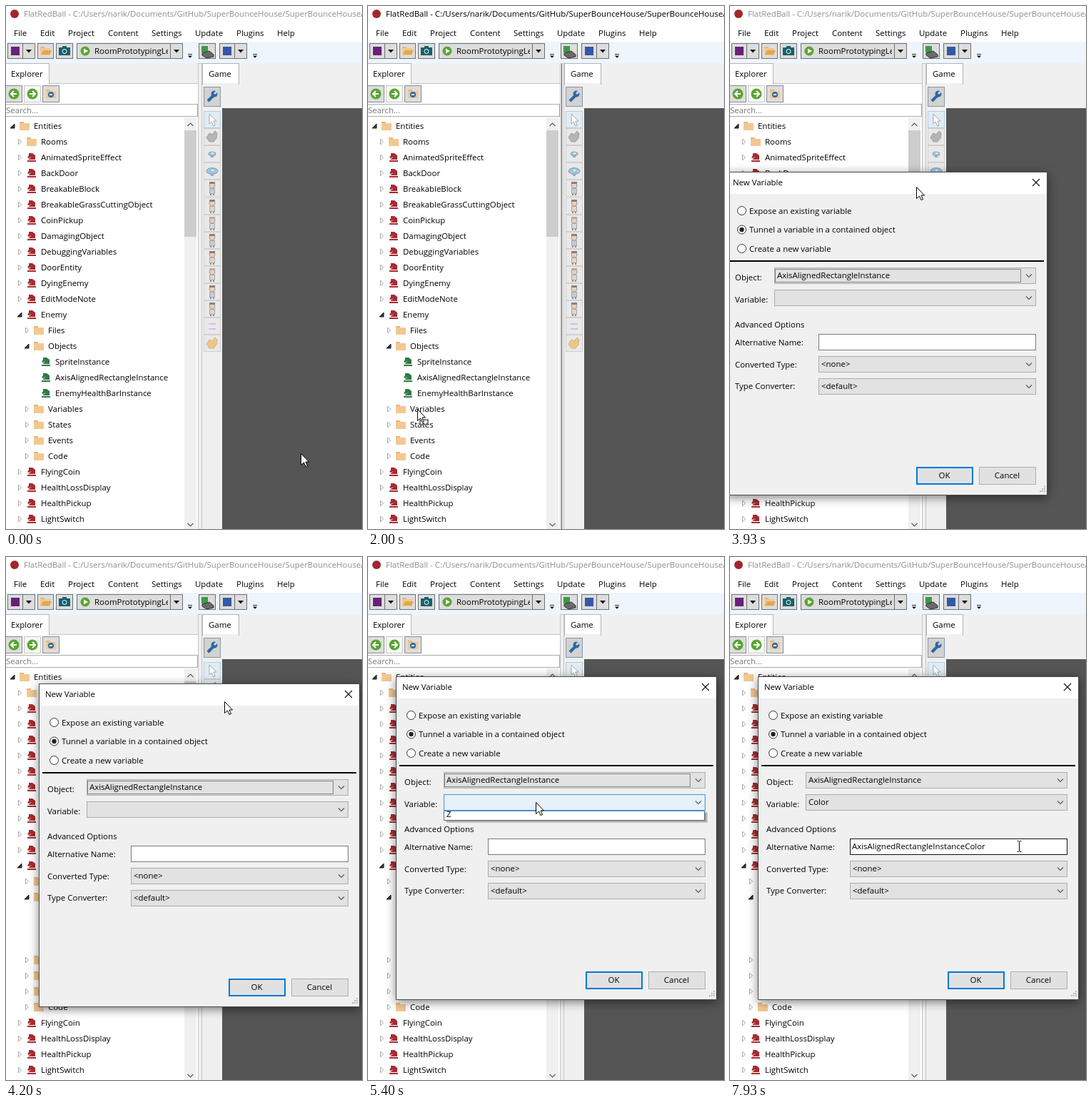
An HTML page with a canvas that plays this animation: 499 px wide and 732 px high, repeating every 8000 ms.

```html
<!DOCTYPE html>
<html lang="en">
<head>
<meta charset="utf-8">
<title>New variable dialog</title>
<style>
html, body { margin: 0; width: 100%; height: 100%; overflow: hidden; background: #fff; }
canvas { display: block; }
</style>
</head>
<body>
<canvas id="stage" width="499" height="732"></canvas>
<script>
const LOOP = 8000, STEP = 1000 / 15;
const DW = 448, DH = 451;
const DRAG = { start: 3660, leg: 270, lead: 20 };
const TIME = { press: 990, drag: 1060, drop: 2790, list: 5385, focus: 5520, choose: 6720, autofill: 6790 };

const stage = document.getElementById('stage').getContext('2d');
const dialogCanvas = document.createElement('canvas');
dialogCanvas.width = DW + 2;
dialogCanvas.height = DH + 2;
const dialogCtx = dialogCanvas.getContext('2d');
dialogCtx.translate(1, 1);
let g = stage;

// Eased cursor moves: start time, end time, destination
const moves = [
  [70, 530, 128, 505], [530, 730, 112, 519], [1060, 1800, 68, 559], [1870, 2000, 69, 564],
  [2990, 3600, 102, 359], [4640, 5330, 235, 343], [6080, 6500, 232, 360], [7400, 7930, 405, 405]];
// Where the dialog passes, one leg of time apart
const dragPath = [[-156, 333], [-5, 234], [47, 178], [40, 168]];

const menu = ['File', 'Edit', 'Project', 'Content', 'Settings', 'Update', 'Plugins', 'Help'];
const choices = ['Color', 'Height', 'Visible', 'Width', 'X', 'Y', 'Z'];
// Depth, kind (v open, > closed, r entity, R open entity, g object), name
const tree = `0v Entities|1> Rooms|1r AnimatedSpriteEffect|1r BackDoor|1r BreakableBlock
1r BreakableGrassCuttingObject|1r CoinPickup|1r DamagingObject|1r DebuggingVariables|1r DoorEntity
1r DyingEnemy|1r EditModeNote|1R Enemy|2> Files|2v Objects|3g SpriteInstance
3g AxisAlignedRectangleInstance|3g EnemyHealthBarInstance|2> Variables|2> States|2> Events|2> Code
1r FlyingCoin|1r HealthLossDisplay|1r HealthPickup|1r LightSwitch`.split(/[|\n]/);

const clamp = (v, a = 0, b = 1) => Math.min(b, Math.max(a, v));

function dialogAt(t) {
  const s = clamp((t - DRAG.start) / DRAG.leg, 0, 3), i = Math.min(2, Math.floor(s)), u = s - i;
  const point = k => dragPath[clamp(k, 0, 3)];
  return [0, 1].map(c => {
    const [p, a, b, n] = [-1, 0, 1, 2].map(k => point(i + k)[c]);
    const m = (b - p) / 2, e = (n - a) / 2;
    return a + u * (m + u * (3 * (b - a) - 2 * m - e + u * (m + e - 2 * (b - a))));
  });
}

function cursorAt(t) {
  if (t >= DRAG.start && t < 4640) {
    const [x, y] = dialogAt(t + DRAG.lead);
    return [Math.round(x + 258), Math.round(y + 26)];
  }
  let x = 413, y = 626;
  for (const [from, to, ex, ey] of moves) {
    if (from == 4640 && t >= from) [x, y] = [298, 194];
    const p = clamp((t - from) / (to - from)), e = p * p * (3 - 2 * p);
    x += (ex - x) * e;
    y += (ey - y) * e;
  }
  return [Math.round(x), Math.round(y)];
}

function fill(x, y, w, h, color) { g.fillStyle = color; g.fillRect(x, y, w, h); }
function box(x, y, w, h, color, border, b = 1) {
  fill(x, y, w, h, border);
  fill(x + b, y + b, w - 2 * b, h - 2 * b, color);
}
function text(s, x, y, color = '#000', align = 'left') {
  g.font = '11.45px "Open Sans", "Noto Sans", sans-serif';
  g.textAlign = align;
  g.fillStyle = color;
  g.fillText(s, x, y + 4);
  return g.measureText(s).width;
}
function shape(x, y, pts, color, line, width = 1, open = false) {
  g.beginPath();
  for (let i = 0; i < pts.length; i += 2) g.lineTo(x + pts[i], y + pts[i + 1]);
  if (!open) g.closePath();
  if (color) { g.fillStyle = color; g.fill(); }
  if (line) { g.strokeStyle = line; g.lineWidth = width; g.stroke(); }
}
const stroke = (x, y, pts, color, width = 1) => shape(x, y, pts, null, color, width, true);
function disc(x, y, r, color, line, flat = 1) {
  g.beginPath();
  g.ellipse(x, y, r, r * flat, 0, 0, 7);
  g.fillStyle = color;
  g.fill();
  if (line) { g.strokeStyle = line; g.lineWidth = 1; g.stroke(); }
}
function clipped(x, y, w, h, paint) {
  g.save();
  g.beginPath();
  g.rect(x, y, w, h);
  g.clip();
  paint();
  g.restore();
}
function dotted(x, y, w, h) {
  g.setLineDash([1, 1]);
  g.strokeStyle = '#222';
  g.lineWidth = 1;
  g.strokeRect(x + .5, y + .5, w, h);
  g.setLineDash([]);
}
const chevron = (x, y, s = 1) => stroke(x, y, [-4, -2 * s, 0, 2 * s, 4, -2 * s], '#555', 1.1);
const dropArrow = (x, y, r = 4) => shape(x, y, [-r, -r / 2, r, -r / 2, 0, r * .6], '#111');

function folder(x, y) {
  fill(x, y - 6, 6, 3, '#e9b57c');
  fill(x, y - 4, 14, 10, '#f2c891');
}
function knight(x, y, color) {
  shape(x, y, [-5, 3, 5, 3, 5, -3, 1, -6, -4, -6, -4, -3, -6, 0, -4, 1, 0, -1], color);
  fill(x - 6, y + 4, 12, 2, color);
}
function greenArrow(x, y, dir) {
  disc(x, y, 7.5, '#5aa432');
  stroke(x, y, [-4 * dir, 0, 4 * dir, 0], '#fff', 2);
  stroke(x, y, [0, -4, 4 * dir, 0, 0, 4], '#fff', 2);
}

function drawTree(hover) {
  if (hover >= 0) fill(0, 157 + hover * 22, 250, 22, '#e5f3fb');
  tree.forEach((row, i) => {
    const x = row[0] * 10, y = 168 + i * 22, kind = row[1];
    if ('vR'.includes(kind)) shape(x + 9, y, [-3, 3, 3, 3, 3, -3], '#333', '#222');
    else if (kind != 'g') shape(x + 9, y, [-1.5, -4, 2.5, 0, -1.5, 4], '#fff', '#a6a6a6');
    if ('v>'.includes(kind)) folder(x + 19, y);
    else knight(x + 26, y, kind == 'g' ? '#2f7a45' : '#a52c31');
    text(row.slice(3), x + 39, y);
  });
  fill(250, 156, 17, 576, '#f0f0f0');
  fill(250, 174, 17, 149, '#cdcdcd');
  chevron(258.5, 166, -1);
  chevron(258.5, 726);
}

function person(y, n) {
  disc(289, y - 4, 4, '#e8d0bd', '#a59b94');
  fill(285, y - 9, 8, 3, n % 3 ? '#8d8079' : '#b9aaa0');
  box(285, y, 8, 8, ['#d4d8dc', '#c4ccd6', '#e3d4c8'][n % 3], '#b0a8a2');
  fill(286, y + 8, 2, 2, '#8b8b8b');
  fill(290, y + 8, 2, 2, '#8b8b8b');
}
const blob = (y, color, edge) => shape(289, y, [-8, 1, -4, -5, 0, -3, 4, -8, 7, -5, 6, 2, 2, 7, -4, 7], color, edge);
function saucer(y, r) {
  disc(289, y, r, '#9fc7df', '#8199ad', .55);
  fill(288, y - 2, 3, 2, '#e4f2fa');
  fill(287, y + r * .6, 4, 2, '#96aab9');
}

function drawPalette() {
  fill(275, 108, 224, 624, '#f0f0f0');
  box(277, 113, 24, 28, '#d2d2d2', '#8795a3');
  stroke(289, 127, [-6, 6, 3, -3], '#2b66a5', 4);
  disc(292, 123, 4.5, '#2b66a5');
  stroke(295, 120, [-3, 3, 3, -3], '#d2d2d2', 3);
  for (let i = 0; i < 14; i++) {
    const y = Math.round(159 + i * 24.1);
    box(277, y - 12, 24, 24, i ? '#e9e9e9' : '#e1ebf3', i ? '#d0d0d0' : '#b9cddd');
    if (i == 0) shape(285, y - 8, [0, 0, 0, 14, 3, 11, 6, 17, 8, 16, 6, 10, 10, 10], '#fff', '#a0a6ab');
    else if (i == 1) blob(y, '#b5b5b5', '#a0a0a0');
    else if (i < 4) saucer(y, i == 2 ? 5 : 8);
    else if (i < 12) person(y, i);
    else if (i == 12) for (const dy of [-4, 3]) fill(284, y + dy, 10, 2, '#d3bce8');
    else blob(y, '#ecc886', '#cdb48a');
  }
  fill(303, 143, 196, 589, '#555');
}

function drawToolbar() {
  const button = (x, w) => box(x, 52, w, 22, '#ddd', '#707070');
  const dropButton = x => { button(x, 18); dropArrow(x + 9, 63); };
  fill(0, 50, 499, 30, '#eef5fd');
  button(2, 22);
  fill(7, 57, 12, 12, '#68217a');
  dropButton(23);
  button(44, 23);
  folder(48, 63);
  shape(49, 68, [0, 0, 3, -6, 15, -6, 12, 0], '#e0a84f');
  button(70, 24);
  fill(74, 58, 16, 11, '#15616d');
  fill(79, 56, 6, 3, '#15616d');
  disc(82, 63.5, 3, '#15616d', '#fff');
  button(99, 132);
  disc(111, 63, 6.5, '#5aa432');
  shape(111, 63, [-2, -3.5, 4, 0, -2, 3.5], '#fff');
  clipped(120, 52, 107, 22, () => text('RoomPrototypingLevel', 124, 63));
  dropButton(230);
  button(270, 24);
  fill(274, 56, 9, 9, '#3b9a46');
  shape(275, 63, [0, 3, 10, 0, 16, 5, 16, 8, 6, 10, 0, 6], '#6a6a6a', '#333');
  button(299, 22);
  fill(304, 57, 12, 12, '#3458a8');
  dropButton(320);
  for (const x of [258, 349]) {
    fill(x - 3, 67, 6, 1, '#333');
    dropArrow(x, 71, 3);
  }
}

function drawTab(x, w, name, base) {
  box(x, 80, w, 30, '#fff', '#b4b4b4');
  fill(x + 1, 108, w - 2, 3, base);
  text(name, x + 9, 95);
}

function drawWindow(active, hover) {
  fill(0, 0, 499, 732, '#fff');
  disc(12, 11, 6, '#a3262c');
  text('FlatRedBall - C:/Users/narik/Documents/GitHub/SuperBounceHouse/SuperBounceHouse/S', 25, 11, active ? '#000' : '#8f8f8f');
  menu.reduce((x, name) => Math.round(x + text(name, x, 38) + 18.7), 11);
  drawToolbar();
  fill(0, 80, 499, 29, '#f0f0f0');
  fill(0, 108, 499, 1, '#c4c4c4');
  drawPalette();
  drawTab(-2, 63, 'Explorer', '#fff');
  drawTab(275, 52, 'Game', '#f0f0f0');
  for (let i = 0; i < 3; i++) box(26 * i - 1, 111, 24, 24, i == 1 ? '#f6f6f6' : '#ddd', i == 1 ? '#c8c8c8' : '#8a8a8a');
  greenArrow(11, 123, -1);
  greenArrow(37, 123, 1);
  folder(56, 123);
  disc(63, 124, 4, '#2d6ba5');
  fill(61, 123, 4, 2, '#fff');
  box(-1, 137, 270, 18, '#fff', '#ababab');
  text('Search...', 0, 146, '#777');
  drawTree(hover);
  box(269, 80, 6, 653, '#f0f0f0', '#c4c4c4');
  if (active) dotted(271, 81, 0, 651);
}

function combo(x, y, value, hot, focus) {
  box(x, y, 433 - x, 23, hot ? '#e5f1fb' : '#e2e2e2', hot ? '#4a90d0' : '#acacac');
  text(value, x + 4, y + 11);
  chevron(423, y + 11.5);
  if (focus) dotted(x + 1, y + 2, 344, 18);
}

function drawChoices(h, my) {
  const x = 66, y = 187;
  for (const d of [2, 4]) fill(x + d, y + d - 1, 366, h, 'rgba(0,0,0,.2)');
  clipped(x, y, 366, h, () => {
    box(x, y + h - 135, 366, 135, '#fff', '#707070');
    choices.forEach((s, i) => {
      const top = y + h - 133 + i * 19;
      if (h == 135 && my >= top && my < top + 19) box(x + 1, top, 364, 19, '#d3e8fa', '#7ebbee');
      text(s, x + 4, top + 10);
    });
    fill(x, y, 366, 1, '#4a90d0');
  });
}

function drawDialog(t, mx, my) {
  const over = (x, y) => t > 4500 && mx >= x && mx < 433 && my >= y && my < y + 23;
  const chosen = t >= TIME.choose, opened = t >= TIME.list && !chosen;
  box(-1, -1, DW + 2, DH + 2, '#f0f0f0', '#4d4d4d');
  fill(0, 0, DW, 30, '#fff');
  text('New Variable', 8, 14);
  for (const d of [-5, 5]) stroke(433, 14, [-5, d, 5, -d], '#111', 1.1);
  ['Expose an existing variable', 'Tunnel a variable in a contained object', 'Create a new variable'].forEach((s, i) => {
    const y = 53.5 + i * 26.5;
    disc(20.5, y, 6, '#fff', '#333');
    if (i == 1) disc(20.5, y, 3.2, '#222');
    text(s, 31, Math.round(y));
  });
  fill(4, 123, 440, 2, '#000');
  ['Object:', 'Variable:'].forEach((s, i) => text(s, 11, 147 + i * 31));
  text('Advanced Options', 11, 213);
  ['Alternative Name:', 'Converted Type:', 'Type Converter:'].forEach((s, i) => text(s, 11, 238 + i * 30.5));
  combo(66, 133, 'AxisAlignedRectangleInstance', over(66, 133) && !opened, t < TIME.focus);
  combo(66, 164, chosen ? 'Color' : '', opened || over(66, 164));
  box(128, 226, 305, 23, '#fff', over(128, 226) ? '#111' : '#7a7a7a');
  if (t >= TIME.autofill) text('AxisAlignedRectangleInstanceColor', 131, 237);
  ['<none>', '<default>'].forEach((s, i) => combo(128, 257 + i * 31, s, over(128, 257 + i * 31)));
  ['OK', 'Cancel'].forEach((s, i) => {
    box(265 + i * 88, 412, 80, 25, '#e1e1e1', i ? '#adadad' : '#0078d7', 2 - i);
    text(s, 304.5 + i * 88, 424, '#000', 'center');
  });
  for (let i = 0; i < 3; i++)
    for (let j = 0; j <= i; j++) fill(444 - j * 3, 439 + i * 3, 2, 2, '#b8b8b8');
  if (opened) drawChoices(Math.round(135 * clamp((t - TIME.list) / 150)), my);
}

function showDialog(t, dx, dy, mx, my) {
  const fade = 1 - (1 - clamp((t - 2740) / 320)) ** 2, size = .955 + .045 * fade;
  g = dialogCtx;
  drawDialog(t, mx, my);
  g = stage;
  g.save();
  g.globalAlpha = fade;
  g.shadowColor = 'rgba(0,0,0,.5)';
  g.shadowBlur = 14;
  g.shadowOffsetY = 3;
  g.translate(dx + DW / 2, dy + DH / 2);
  g.scale(size, size);
  g.drawImage(dialogCanvas, -DW / 2 - 1, -DH / 2 - 1);
  g.restore();
}

function drawCursor(x, y, kind) {
  if (kind == 'beam') {
    for (const s of [-1, 1]) stroke(x + .5, y, [-3, 7.5 * s, -1, 7.5 * s, 0, 6.5 * s, 1, 7.5 * s, 3, 7.5 * s], '#000');
    fill(x, y - 7, 1, 14, '#000');
    return;
  }
  shape(x + .5, y + .5, [0, 0, 0, 16, 4, 12.5, 6.5, 18, 9, 17, 6.5, 11.5, 11, 11.5], '#fff', '#000');
  if (kind == 'drag') {
    for (let j = 0; j < 9; j++)
      for (let i = 0; i < 13; i++)
        if (j < 2 || j > 6 || i < 2 || i > 10) fill(x + 3 + i, y + 14 + j, 1, 1, (i + j) % 2 ? '#000' : '#fff');
  }
}

function draw(now) {
  const t = Math.floor((now % LOOP + 4) / STEP) * STEP;
  const [x, y] = cursorAt(t), [dx, dy] = dialogAt(t).map(Math.round);
  const shown = t >= TIME.drop, mx = x - dx, my = y - dy;
  const hover = t < TIME.drag && x < 250 ? Math.floor((y - 157) / 22) : -1;
  drawWindow(t >= TIME.press && !shown, hover);
  if (shown) showDialog(t, dx, dy, mx, my);
  const overField = shown && mx >= 128 && mx < 433 && my >= 226 && my < 249;
  drawCursor(x, y, overField ? 'beam' : t >= TIME.drag && !shown ? 'drag' : 'arrow');
}

const start = performance.now();
function frame() {
  draw(performance.now() - start);
  requestAnimationFrame(frame);
}
frame();
</script>
</body>
</html>
```
